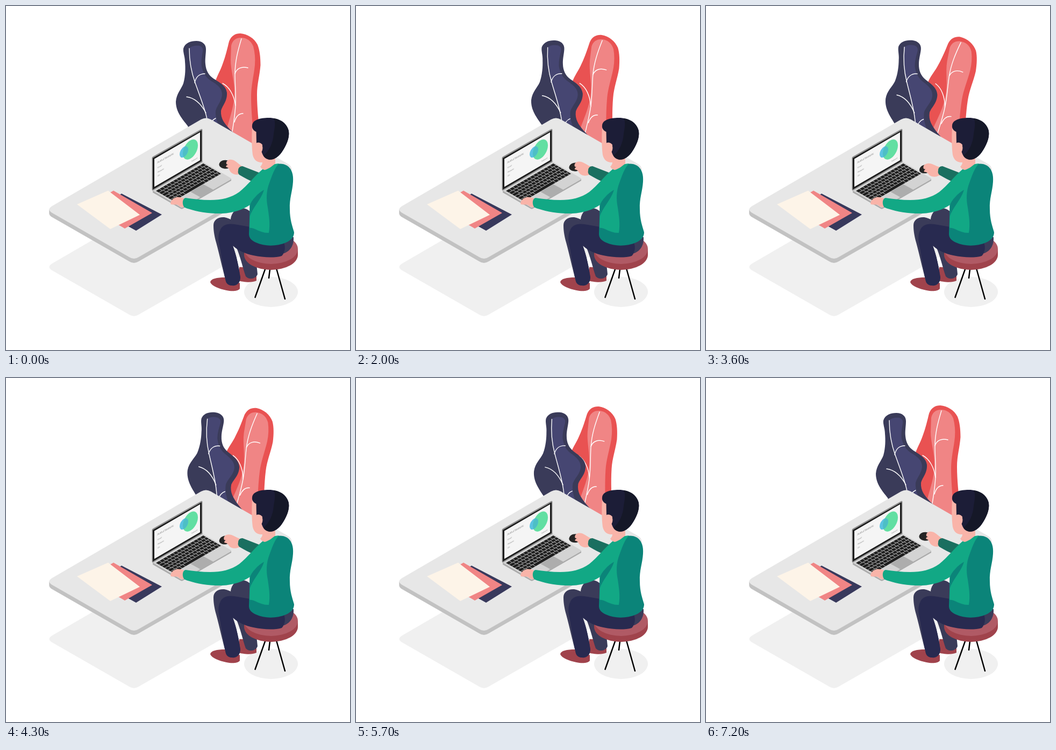
An HTML page with a canvas that plays this animation: 640x640 px, repeating every 8 s.

```html
<!DOCTYPE html>
<html lang="en">
<head>
<meta charset="utf-8">
<title>Desk work</title>
<style>
html, body { margin: 0; width: 100%; height: 100%; overflow: hidden; background: #fff; }
canvas { display: block; width: 640px; height: 640px; }
</style>
</head>
<body>
<canvas id="stage" width="640" height="640"></canvas>
<script>
const ctx = document.getElementById('stage').getContext('2d');
const LOOP = 8000, SWING = 7200, STEP = 100;

const NAVY = '#282a50', SLATE = '#3a3b59', SKIN = '#f9b4a9';
const GREEN = '#12a885', TEAL = '#0b8479', SHOE = '#a0434c', SHADOW = '#f0f0f0';

const cache = {};
const path = d => cache[d] || (cache[d] = new Path2D(d));

function fill(color, d) {
  ctx.fillStyle = color;
  ctx.fill(path(d));
}

function line(color, width, d) {
  ctx.strokeStyle = color;
  ctx.lineWidth = width;
  ctx.lineCap = 'round';
  ctx.stroke(path(d));
}

function oval(color, x, y, rx, ry) {
  ctx.fillStyle = color;
  ctx.beginPath();
  ctx.ellipse(x, y, rx, ry, 0, 0, Math.PI * 2);
  ctx.fill();
}

function shifted(dx, dy, draw) {
  ctx.save();
  ctx.translate(dx, dy);
  draw();
  ctx.restore();
}

function turned(x, y, degrees, draw) {
  ctx.save();
  ctx.translate(x, y);
  ctx.rotate(degrees * Math.PI / 180);
  ctx.translate(-x, -y);
  draw();
  ctx.restore();
}

// Linear rise from 0 to 1 at the peak, then linear fall back to 0.
const swing = (t, peak) => t < peak ? t / peak : Math.max(0, (SWING - t) / (SWING - peak));

function redLeaf() {
  fill('#e95252', 'M411 301C398 255 385 225 386 180C386 160 387 149 390 139C393 129 399 120 403 108C409 92 412 78 415 66C419 55 427 51 436 51C449 52 462 60 468 72C472 82 473.500 95 473.500 110C472 130 467 145 467 165C467 190 470 215 473 245L475 301Z');
  fill('#f08585', 'M419 74C421 64 428 59 437 59C448 59 456 65 460 75C463 86 464 98 463 110C461 130 456 148 456 168C456 190 458 215 461 245L463 301H414C405 270 405 250 411 228C417 205 425 185 425 160C425 138 418 120 418 100Z');
  line('#fff', 1.4, 'M438 61C431 84 426 104 426 127C426 145 428 165 427 185C426 204 423 220 420 240');
  line('#fff', 1.4, 'M426 126C429 116 438 112 450 115');
  line('#fff', 1.4, 'M403 144C415 150 424 165 427 185');
  line('#fff', 1.4, 'M425 216C428 205 434 200 441 200');
}

function blueLeaf() {
  fill(SLATE, 'M352 290C345 262 345 238 338 223C328 210 316 197 316 178C317 163 326 155 330 144C334 130 334 115 333 104C333 94 329 86 330 79C333 69 343 65 354 65C365 65 372 71 372 80C372 90 370 98 371 108C372 120 377 129 386 135C397 142 409 148 411 161C412 177 403 184 400 195C399 210 407 219 416 229C428 241 444 252 452 290Z');
  fill('#464672', 'M341 79C345 74 353 73 360 74C365 76 367 79 366 85C364 96 363 104 364 113C367 125 372 133 381 139C391 145 402 152 402 164C402 176 393 184 390 195C389 207 394 220 401 232L417 290H390C383 262 380 236 374 210C369 190 360 165 352 143C344 122 341 101 341 79Z');
  line('#fff', 1.4, 'M341 79C341 104 345 124 352 143C360 166 369 187 374 210C377 222 379 232 381 245');
  line('#fff', 1.4, 'M351 143C353 132 360 126 370 126');
  line('#fff', 1.4, 'M336 169C352 171 364 184 372 199');
  line('#fff', 1.4, 'M379 226C381 216 385 211 390 209');
}

const TABLE = 'M363 211Q372 206 381 211L525 294Q536 301 525 308L247 467Q238 473 229 467L86 385Q75 378.500 86 372Z';

function desk() {
  for (let dy = 1; dy <= 8; dy++) shifted(0, dy, () => fill('#c2c2c2', TABLE));
  fill('#e7e7e7', TABLE);
}

function papers() {
  fill('#38395c', 'M215 349L290 388L242 418L170 378Z');
  fill('#f08585', 'M200 343.500L272 385L221 414L150 372Z');
  fill('#fdf4e8', 'M132 369L190 343.500L249 388.500L194 415Z');
}

function keyboard() {
  const at = (u, v) => [279 + 88 * u + 33 * v, 344 - 51 * u + 19 * v];
  fill('#1e1e1e', 'M279 344L367 293L400 312L312 363Z');
  ctx.strokeStyle = '#c4c4c4';
  ctx.lineWidth = 0.9;
  ctx.beginPath();
  const rows = 6, cols = 14;
  for (let r = 0; r < rows; r++) {
    const top = r / rows, bottom = (r + 1) / rows;
    if (r) {
      ctx.moveTo(...at(0, top));
      ctx.lineTo(...at(1, top));
    }
    for (let c = 1; c < cols; c++) {
      if (r === rows - 1 && c > 3 && c < 9) continue;
      const u = (c + (r % 3) * 0.25) / cols;
      ctx.moveTo(...at(u, top));
      ctx.lineTo(...at(u, bottom));
    }
  }
  ctx.stroke();
}

function screenText(text, x, y, size) {
  ctx.save();
  ctx.transform(1, -0.56, 0, 1, x, y);
  ctx.font = size + 'px Lato, sans-serif';
  ctx.fillStyle = '#808080';
  ctx.fillText(text, 0, 0);
  ctx.restore();
}

function disc(color, x, y, rx, ry) {
  ctx.save();
  ctx.transform(1, -0.56, 0, 1, x, y);
  oval(color, 0, 0, rx, ry);
  ctx.restore();
}

function laptop() {
  fill('#aaa', 'M273 343V347L325 377Q327 378 329 377L419 325V321Z');
  fill('#d3d3d3', 'M272 343L365 289L418 320Q420 322 418 323L329 374.500Q327 375.500 325 374.500Z');
  keyboard();
  fill('#adadad', 'M343 345.500L367 331.500L386 342L362 356Z');
  fill('#8d8d8d', 'M271.500 283Q271.500 281 273.500 280L363 229Q365.500 228 365.500 231V290L274 343Q271.500 344 271.500 341Z');
  fill('#1c1c1c', 'M273 283L364 231V288.500L273 341.500Z');
  fill('#f5f5f5', 'M276 284.500L361 235V287L276 336.500Z');
  disc('#62dfa2', 343, 267, 14, 17);
  disc('#5cc3e2', 331, 271.500, 8, 9.500);
  ctx.save();
  ctx.beginPath();
  ctx.transform(1, -0.56, 0, 1, 343, 267);
  ctx.ellipse(0, 0, 14, 17, 0, 0, Math.PI * 2);
  ctx.clip();
  ctx.setTransform(1, 0, 0, 1, 0, 0);
  disc('#4dbfc5', 331, 271.500, 8, 9.500);
  ctx.restore();
  screenText('Artful Statistic', 281.500, 293, 4.900);
  screenText('Email', 282, 302, 3.300);
  screenText('Website', 282, 310.500, 3.300);
  screenText('On', 282, 317.500, 3.300);
  screenText('Support', 345, 290, 3.300);
}

function mouse() {
  fill('#252525', 'M396.500 294C398 289 403 286 410 287C417 288 421 294 418 299C415 303 407 304 401 301C398 299 396 297 396.500 294Z');
}

function rightHand() {
  fill(SKIN, 'M410 291C411 287 415 285 420 286C427 287 431 293 439 298L446 302L442 315L434 313C428 315 422 313 418 309C415 305 415 301 411 300C408 299 409 297 413 295C411 295 409 294 410 291Z');
}

function stool() {
  oval(SHADOW, 493, 532, 50, 28);
  line('#000', 2.5, 'M482 490L463.500 542M491 490L489 506M503.500 490L519 545');
}

function seat() {
  oval(SHOE, 493, 463, 50, 28);
  ctx.fillStyle = SHOE;
  ctx.fillRect(443, 452, 100, 11);
  oval('#b05a65', 493, 452, 50, 28);
}

function backLeg() {
  fill(SHOE, 'M434 486C445 484 458 492 466 502V511C456 516 440 513 432 511Z');
  fill(SLATE, 'M418 396C420 382 430 375 441 376C452 378 460 386 466 398L475 440L461 455C464 470 467 485 468 499C465 508 452 510 446 503C440 486 436 465 428 448Z');
}

function frontLeg() {
  fill(SHOE, 'M380 514C381 507 393 505 407 505L435 515.500V526C431 531 420 531 410 529C396 526 383 521 380 514Z');
  fill(SLATE, 'M386 408C386 398 395 392 406 393C412 394 416 396 420 398L460 410L535 430C536 444 530 455 518 460L450 458L422 446C429 465 433 485 436 505C436 516 428 521 420 520C414 520 410 516 409 512C403 490 397 462 391 440C387 426 386 416 386 408Z');
  fill(NAVY, 'M398 418C402 407 412 404 425 406L460 412L517 440C521 450 518 460 513 465C500 469 478 468 460 464C445 461 432 455 422 446C429 465 433 485 436 505C435 517 428 521 420 520C414 520 410 516 409 512C404 490 401 465 396 440C395 432 395 424 398 418Z');
}

function body() {
  fill('#1a6f60', 'M432 306C432 301 435 298 440 298L476 312L464 329C453 325 443 319 434 314C432 312 431 309 432 306Z');
  fill(TEAL, 'M490 300C500 293 513 291 523 297C532 303 535 314 534 327C533 345 527 358 528 378C528 398 533 410 536 421C536 430 530 436 521 440C505 447 482 448 465 440C456 436 452 431 452 424L454 365Z');
  fill(GREEN, 'M508 293C496 294 485 297 477 304C462 317 449 334 434 346C419 357 400 361 380 361C364 361 348 359 334 357C329 358 327 365 329 371C331 375 335 376 340 377.500C356 383 378 386.500 402 386C424 385 440 379 454 370L453 413C462 411 472 423 489 422C492 405 489 390 487 375C484 360 484 344 490 329C495 316 499 302 508 293Z');
  fill(TEAL, 'M480 342C468 349 457 361 453.500 371V392C459 374 474 362 480 342Z');
  fill(SKIN, 'M306 367C307 362 311 357 317 356C322 355 327 356 331 358C328 363 328 368 331 374C327 375 322 373 320 370C315 369 311 370 307 369Z');
}

function head() {
  fill(SKIN, 'M479 282L501 284V293C494 299 487 304 481 305C477 304 474 301 473 299C476 296 477 293 477 291Z');
  fill(SKIN, 'M458 225C457 244 457 262 459 277C461 286 467 291 475 291C483 291 489 286 493 280L490 230Z');
  fill('#1c1d37', 'M458 222C459 212 472 208 489 208C507 208 522 217 526 232C528 246 521 260 513 272C505 283 495 288 487 285C480 283 477 277 475 269L477 258C473 254 468 253 466 255L465.500 234C461 232 457 228 458 222Z');
  fill('#151828', 'M498 209C514 211 524 221 526 233C528 246 521 260 513 272C505 283 495 288 487 285C483 284 481 281 479 278C490 270 497 254 498 238C500 225 502 217 498 209Z');
  oval(SKIN, 471.500, 264, 6, 9.500);
}

function render(t) {
  const sway = swing(t, 3600);
  ctx.clearRect(0, 0, 640, 640);
  shifted(0, 107, () => fill(SHADOW, TABLE));
  turned(411.5, 301, 8.75 * sway, redLeaf);
  turned(380, 353, 7.8 * swing(t, 4800), blueLeaf);
  desk();
  papers();
  laptop();
  turned(440, 298, -15 * sway, () => {
    mouse();
    shifted(-5 * sway, 0, rightHand);
  });
  stool();
  backLeg();
  seat();
  frontLeg();
  body();
  head();
}

function tick() {
  const t = performance.now() % LOOP;
  render(Math.floor(t / STEP) * STEP);
  requestAnimationFrame(tick);
}
tick();
</script>
</body>
</html>
```
